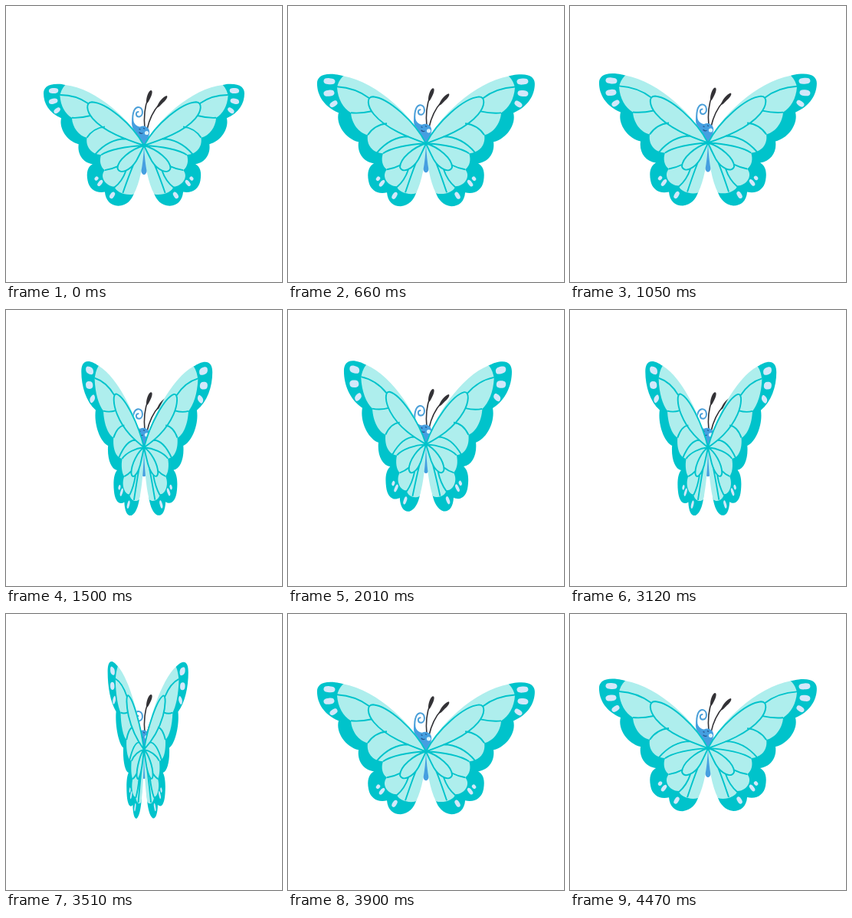
Recreate the animation shown at these times as an HTML page. Size 360 by 360 pixels, loop 4.5 s.

```html
<!DOCTYPE html>
<html lang="en">
<head>
<meta charset="utf-8">
<title>Butterfly</title>
<style>
html, body { margin: 0; width: 100%; height: 100%; overflow: hidden; background: #fff; }
svg { display: block; width: 100vw; height: 100vh; }
</style>
</head>
<body>
<svg id="stage" viewBox="0 0 360 360">
  <g id="body">
    <path fill="none" stroke="#333236" stroke-width="1.6" stroke-linecap="round" d="M181 157C179.500 142 181 128 185.500 117M184 158C187 144 192 134 200 125"/>
    <g fill="#333236">
      <path d="M183 124C182.500 116 186 107.500 189 107C192 107 190.500 113 188 117.500C186.500 120.500 185 124 183 124Z"/>
      <path d="M197 129.500C198 123 205 115 209.500 114C212 115 208.500 120 205.500 122.500C202.500 125 199.500 129.500 197 129.500Z"/>
    </g>
    <path fill="none" stroke="#4a9fd8" stroke-width="2" stroke-linecap="round" d="M166 151C164 141 166 130 172 129C179 128.500 180 140 174 141.500C169 142 168.500 135 172.500 135"/>
    <path fill="#459fe0" d="M165 143C166 150 170 154 175 154.500C179 152 186 154 187 160C188 166 184 170 183 180H177C176 172 172 166 168 161C164 156 163 149 165 143Z"/>
    <path fill="#459fe0" d="M178 178H182C181 190 184 202 184 211C183 219 177 219 176 211C176 202 179 190 178 178Z"/>
    <circle cx="183.500" cy="162.500" r="2.600" fill="#d9f3fb"/>
    <path fill="none" stroke="#27558c" stroke-width="1.300" stroke-linecap="round" d="M174 157.500l1 .5M179.500 156.500l1 .5M174 162q2 2 4 1"/>
  </g>
  <g id="wings"></g>
</svg>
<script>
const NS = 'http://www.w3.org/2000/svg';
const TEAL = '#00c3cb', PALE = '#aeeeed', SPOT = '#d3e8fa';
const CX = 180, CY = 179, RAD = Math.PI / 180, REST = 17 * RAD;

// Left wing, drawn around the hinge (CX, CY) at the resting angle.
const rim = 'M180 179L72 91C68 90 65 89.2 62 89C44 87 38 93 38 101C38 116 47 131 66 139' +
  'C62 154 75 173 92 177C90 191 98 203 112 205C105 209 103 217 105 228C107 240 117 246 129 243' +
  'C130 255 137 261 147 261C158 260 164 252 167 244Z';
const light = 'M180 179C165 146 117 99 72 91C67 96 65 101 64 106C65 121 72 133 82 139' +
  'C83 153 92 165 104 168C102 181 110 191 124 192C121 200 123 209 129 213' +
  'C121 222 130 235 142 235C143 242 157 247 167 244C175 228 179 205 180 179Z';
const veins = [
  'M180 179C165 150 131 120 111 118C102 118 103 130 112 141C128 160 157 171 180 179',
  'M64 105C80 106 93 110 106 120', 'M82 139C92 140 100 139 109 137',
  'M104 168C110 159 119 154 129 153', 'M124 192C134 185 157 180 180 179',
  'M116 191C128 177 143 170 157 170',
  'M180 179C163 184 146 199 146 210C149 219 163 212 170 200C174 192 177 186 180 179',
  'M129 213C135 212 141 210 147 207', 'M142 236C149 230 154 222 157 213',
  'M153 243C157 231 162 216 167 204'
];

function oval(x, y, a, b, deg) {
  const c = Math.cos(deg * RAD), s = Math.sin(deg * RAD), k = 0.7;
  const at = (p, q) => (x + p * a * c - q * b * s).toFixed(2) + ' ' + (y + p * a * s + q * b * c).toFixed(2);
  return `M${at(1, 0)}C${at(1, k)} ${at(k, 1)} ${at(0, 1)}C${at(-k, 1)} ${at(-1, k)} ${at(-1, 0)}` +
    `C${at(-1, -k)} ${at(-k, -1)} ${at(0, -1)}C${at(k, -1)} ${at(1, -k)} ${at(1, 0)}Z`;
}
const spots = [
  oval(54, 98, 7.5, 4, 4), oval(53.5, 113.5, 7, 4, -6), oval(59.5, 127.5, 5.5, 3.4, -34),
  oval(117.5, 225, 3, 2.4, -50), oval(122.5, 231, 5, 2.5, -52), oval(139, 247, 5, 2.8, -58)
].join('');

const layers = [[rim, TEAL], [light, PALE], [veins.join(''), null], [spots, SPOT]];
const wingsBox = document.getElementById('wings');
const body = document.getElementById('body');

function makeWing(side) {
  const parts = layers.map(([d, fill]) => {
    const el = document.createElementNS(NS, 'path');
    el.setAttribute('fill', fill || 'none');
    if (!fill) {
      el.setAttribute('stroke', TEAL);
      el.setAttribute('stroke-width', 1.9);
      el.setAttribute('stroke-linejoin', 'round');
    }
    wingsBox.appendChild(el);
    return { el, d };
  });
  return { side, parts };
}
const wings = [makeWing(-1), makeWing(1)];

// Turn the wing about the body axis, with perspective.
function fold(d, angle, side) {
  const c = Math.cos(angle) / Math.cos(REST);
  const s = Math.sin(angle) - Math.sin(REST);
  return d.replace(/(-?[\d.]+) (-?[\d.]+)/g, (m, x, y) => {
    const u = CX - x, v = y - CY, near = s * 0.00284 * u;
    return (CX + side * u * c * (1 + near)).toFixed(2) + ' ' +
      (CY + v * (1 + s * 0.04 + near)).toFixed(2);
  });
}

// The flight restarts every 54 steps, just before the third beat ends.
const LOOP = 4500, STEP = 30, FLIGHT = 54, BEAT = 19, BOB = 28;
const wave = (n, period) => Math.cos(2 * Math.PI * n / period);

function draw(ms) {
  const n = Math.floor((ms % LOOP) / STEP) % FLIGHT;
  const angle = 38 * RAD * (1 - wave(n, BEAT));
  const shift = `translate(0 ${(-0.5 + 3.5 * wave(n, BOB)).toFixed(2)})`;
  body.setAttribute('transform', shift);
  wingsBox.setAttribute('transform', shift);
  for (const { side, parts } of wings) {
    const a = side > 0 ? angle * 0.955 : angle;
    for (const { el, d } of parts) el.setAttribute('d', fold(d, a, side));
  }
}

const start = performance.now();
function tick() {
  draw(performance.now() - start);
  requestAnimationFrame(tick);
}
draw(0);
requestAnimationFrame(tick);
</script>
</body>
</html>
```
